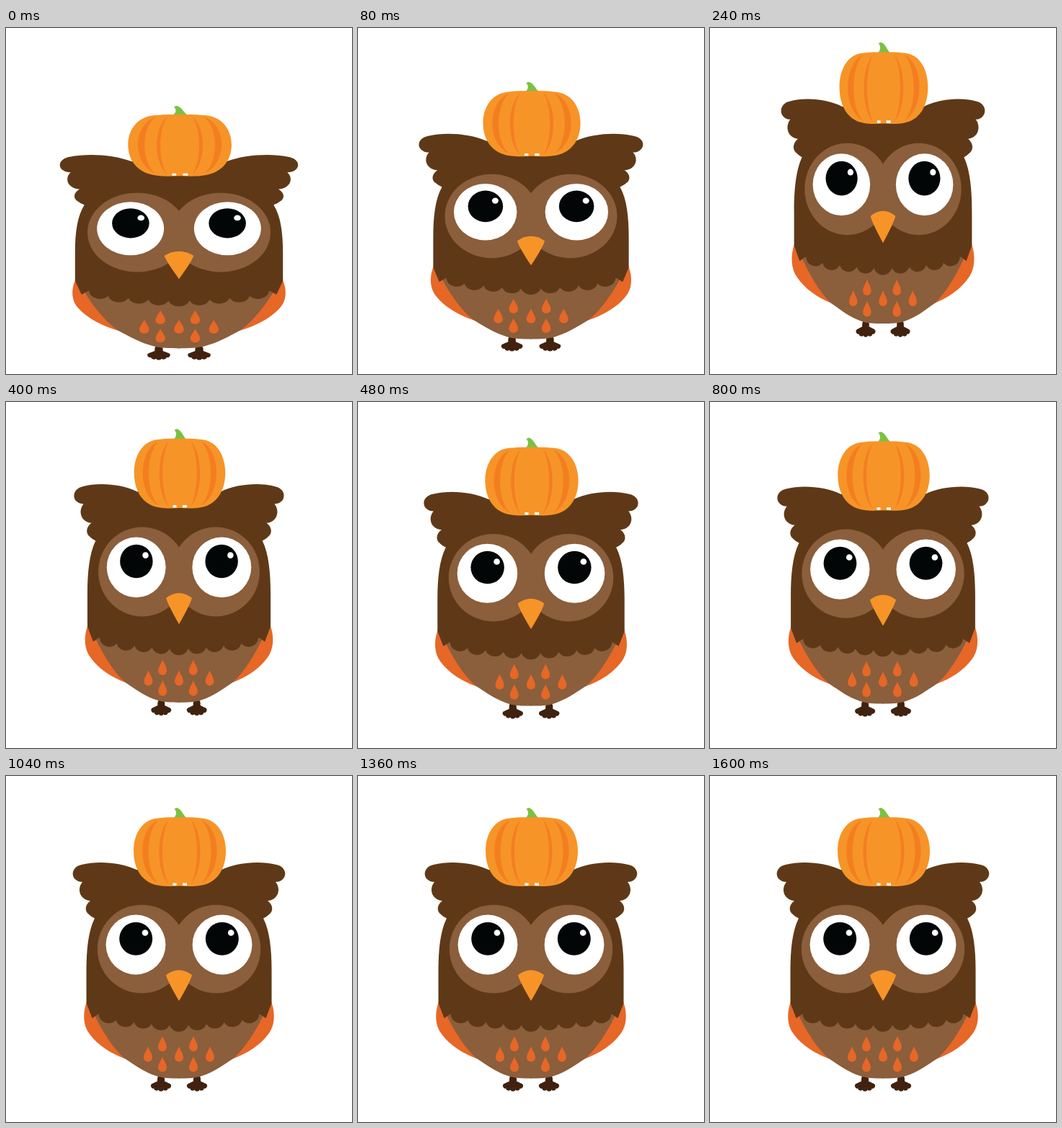
These frames come from a looping animation (480 px wide and 480 px high, 1.92 s). An HTML page:

```html
<!DOCTYPE html>
<html lang="en">
<head>
<meta charset="utf-8">
<title>Bouncing owl</title>
<style>
  html, body { margin: 0; width: 100%; height: 100%; overflow: hidden; background: #fff; }
  svg { display: block; width: 100vw; height: 100vh; }
  .dark { fill: #5f3917; }
  .light { fill: #8b5e3c; }
  .rust { fill: #e66726; }
  .gold { fill: #f79428; }
  .foot { fill: none; stroke: #40220f; stroke-linecap: round; }
  .rib { fill: #f37e20; }
</style>
</head>
<body>
<svg viewBox="0 0 480 480">
  <defs>
    <path id="drop" class="rust" d="M0 -11 C1.5 -6 6 -1 6 4.5 A6 6 0 0 1 -6 4.5 C-6 -1 -1.5 -6 0 -11Z"/>
  </defs>
  <g id="owl">
    <g id="half">
      <g class="foot">
        <path stroke-width="10" d="M215 420V431"/>
        <path stroke-width="7" d="M215 425L204.5 430M215 425L225.5 430M210 430L209 433M220 430L221 433M215 430V434"/>
      </g>
      <path class="rust" d="M112 313 C106 329 107 347 116 358 C127 373 145 385 166 392.5 L180 370 L130 320Z"/>
      <path class="light" d="M124 334 C133 352 147 376 164 391.5 C180 402 192 411 208 416 C216 419 228 419.5 241 419.5 V320 H125Z"/>
      <path class="dark" d="M241 135 L181 130 C160 120 128 117 105 123 C91 126 90 139 97 144 C99 146 102 147 106 147 C100 154 101 164 107 169 C109 171 113 173 117 173 C109 179 109 188 115 192 C117 194 120 196 123 197.500 C114 215 111.500 242 111.500 270 L111.500 315 L119.500 336 L128.600 330 A13.800 13.800 0 0 0 152.500 338.500 A13.800 13.800 0 0 0 177.500 341.500 A13.800 13.800 0 0 0 202 344 A13.800 13.800 0 0 0 227 345.500 A13.800 13.800 0 0 0 253 345.500 V135Z"/>
    </g>
    <use href="#half" transform="matrix(-1 0 0 1 480 0)"/>
    <g id="eye">
      <ellipse class="light" cx="188.3" cy="240" rx="61.5" ry="61.3"/>
      <circle cx="180" cy="234" r="41.4" fill="#fff"/>
      <circle cx="180.200" cy="225.700" r="23" fill="#020606"/>
    </g>
    <use href="#eye" transform="matrix(-1 0 0 1 480 0)"/>
    <circle cx="193" cy="217.500" r="4.300" fill="#fff"/>
    <circle cx="312.200" cy="217.500" r="4.300" fill="#fff"/>
    <path class="gold" d="M222 276 Q240 262.500 258 276 Q257 283 240 312 Q223 283 222 276Z"/>
    <use href="#drop" x="217" y="371.500"/>
    <use href="#drop" x="260" y="371.500"/>
    <use href="#drop" x="197" y="386"/>
    <use href="#drop" x="240" y="386"/>
    <use href="#drop" x="283" y="386"/>
    <use href="#drop" x="217" y="400"/>
    <use href="#drop" x="260" y="400"/>
    <path fill="#7ac143" d="M232.500 58 C237 55 237 49 233.500 45.500 L237 44 C243.500 46 244.500 52 250 58Z"/>
    <path class="gold" d="M241 57.500 C252 57 263 57.500 271 58.500 C294 60 305 82 305 104 C305 130 292 149 269 152 C260 153.500 250 153 241 152.500 C232 153 222 153.500 213 152 C190 149 177 130 177 104 C177 82 188 60 211 58.500 C219 57.500 230 57 241 57.500Z"/>
    <g id="ribs" class="rib">
      <path d="M211 61 C182 74 182 134 211 149 C193 131 193 79 211 61Z"/>
      <path d="M226 60 C208 78 208 132 226 151 C214 130 214 80 226 60Z"/>
    </g>
    <use href="#ribs" transform="matrix(-1 0 0 1 482 0)"/>
    <path fill="#fff" d="M231.500 148.500h5v3.500h-5zM245 148.500h6v3.500h-6z"/>
  </g>
</svg>
<script>
  const LOOP = 1920, STEP = 80;
  // Squash amount per step: 1 is fully squashed, negative is stretched, 0 is rest.
  const squash = [1, .48, -.09, -.38, -.295, -.105, .085, .128, .064, -.005,
                  -.043, -.043, -.016, 0, .015, .01];
  const owl = document.getElementById('owl');

  function pose(u) {
    const sx = 1 + .11 * u + .012 * u * u;
    const sy = 1 - .104 * u;
    const dx = 240 * (1 - sx);
    const dy = 44 * (1 - sy) + 64 * u;
    owl.setAttribute('transform', `matrix(${sx} 0 0 ${sy} ${dx} ${dy})`);
  }

  const start = performance.now();
  function draw(now) {
    const t = Math.max(0, now - start) % LOOP;
    pose(squash[Math.floor(t / STEP)] ?? 0);
    requestAnimationFrame(draw);
  }
  draw(start);
</script>
</body>
</html>
```
